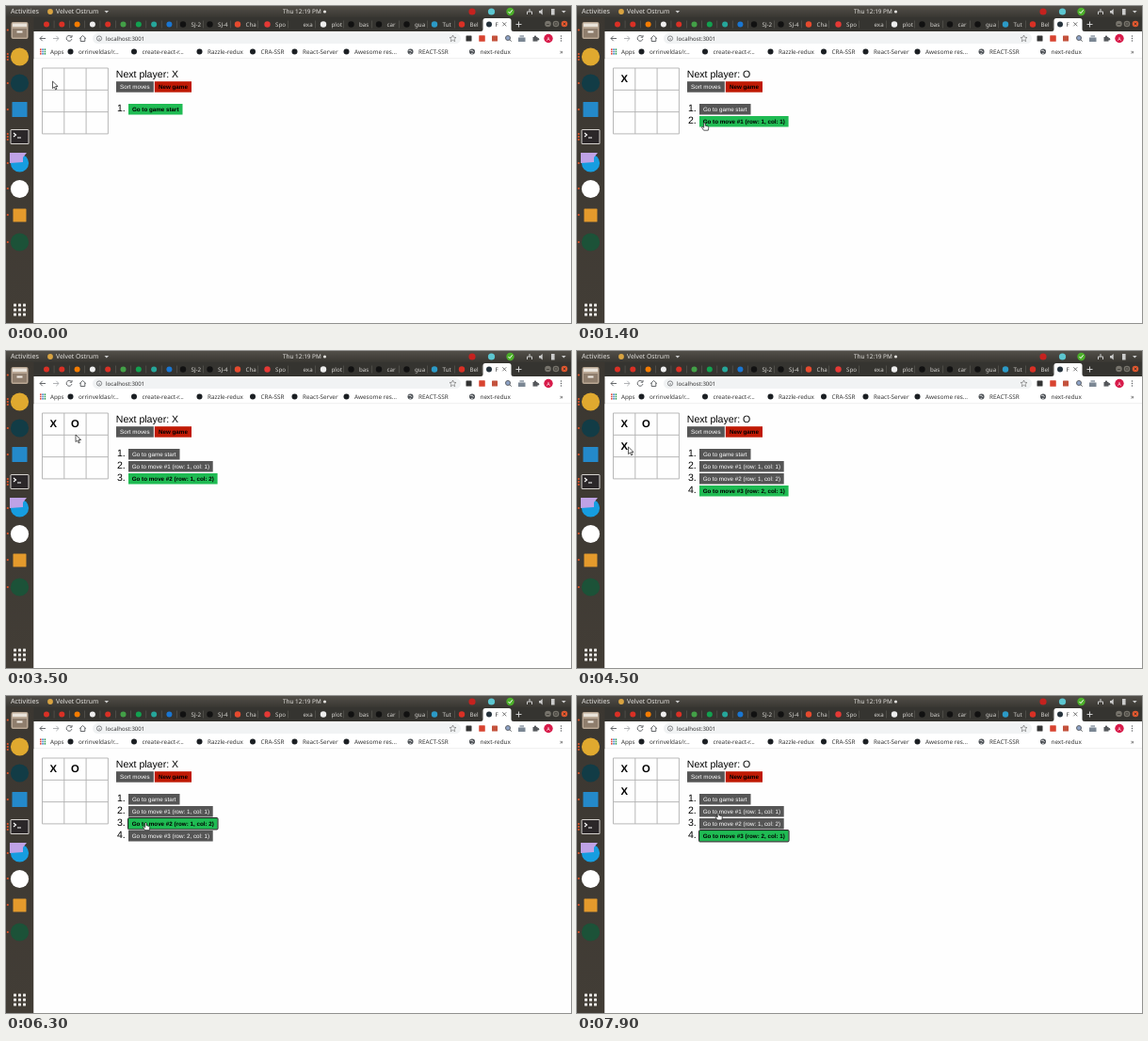
Animation of 600x337 px, one loop 8000 ms. Source, as an HTML page:

```html
<!DOCTYPE html>
<html lang="en">
<head>
<meta charset="utf-8">
<title>Tic-tac-toe moves</title>
<style>
html, body { margin: 0; width: 100%; height: 100%; overflow: hidden; background: #fff; }
svg { display: block; width: 600px; height: 337px; }
text { text-rendering: geometricPrecision; white-space: pre; }
.ui { font-family: "Noto Sans", "Open Sans", sans-serif; }
.page { font-family: "Liberation Sans", Arial, sans-serif; }
</style>
</head>
<body>
<svg viewBox="0 0 600 337">
  <defs>
    <linearGradient id="panel" x2="0" y2="1">
      <stop stop-color="#524f49"/><stop offset="1" stop-color="#393732"/>
    </linearGradient>
    <linearGradient id="dock" x2="0" y2="1">
      <stop stop-color="#3b3731"/><stop offset="1" stop-color="#423d36"/>
    </linearGradient>
  </defs>
  <g id="shell" class="ui"></g>
  <g id="game" class="page"></g>
  <g id="cursor"></g>
</svg>
<script>
const LOOP = 8000, STEP = 100;
const $ = id => document.getElementById(id);

const rect = (x, y, w, h, fill, more = '') =>
  `<rect x="${x}" y="${y}" width="${w}" height="${h}" fill="${fill}" ${more}/>`;
const dot = (x, y, r, fill, more = '') =>
  `<circle cx="${x}" cy="${y}" r="${r}" fill="${fill}" ${more}/>`;
const line = (d, color, w = 1) =>
  `<path d="${d}" fill="none" stroke="${color}" stroke-width="${w}"/>`;
const label = (x, y, size, fill, str, more = '') =>
  `<text x="${x}" y="${y}" font-size="${size}" fill="${fill}" ${more}>${str}</text>`;
const square = (x, y, s, fill) => rect(x - s / 2, y - s / 2, s, s, fill, 'rx=".6"');

function topBar() {
  const pale = '#e4e2df';
  return rect(0, 0, 600, 12, 'url(#panel)') +
    label(5, 8.4, 7.2, pale, 'Activities') +
    dot(47, 6, 2.9, '#d9a441') +
    label(53, 8.4, 6.8, pale, 'Velvet Ostrum') +
    '<path d="M104.500 5h4.600l-2.300 2.600z" fill="#ccc"/>' +
    label(294, 8.4, 6.4, pale, 'Thu 12:19 PM') + dot(338.5, 6, 1.6, pale) +
    dot(495, 6, 3.6, '#c5221f') + dot(515.5, 6, 3.6, '#5cc6d0') +
    dot(535.5, 6, 4.2, '#4caf2a') + line('M533.500 6l1.500 1.700 2.600-3.400', '#fff', 1) +
    line('M556 3v3M553.500 9v-3h5v3', '#ccc', 1) +
    '<path d="M566 5h1.500l2.200-2v6.500l-2.200-2h-1.500z" fill="#ccc"/>' +
    rect(579, 3, 3.6, 6.5, '#ccc') +
    '<path d="M590 5h4.600l-2.300 2.600z" fill="#ccc"/>';
}

function tabs() {
  let s = rect(29, 12, 571, 15, '#353430');
  const pins = ['#d93025', '#d93025', '#f57c00', '#eee', '#d93025',
    '#43a047', '#12a150', '#26a69a', '#1976d2'];
  pins.forEach((c, i) => {
    const x = 43 + i * 16.3;
    s += dot(x, 19.5, 3, c) + rect(x + 7.8, 15.5, .5, 8, '#66645f');
  });
  const open = [
    [188, '#111', 'SJ-2'], [216.5, '#111', 'SJ-4'], [246, '#e64a2e', 'Cha'],
    [277.5, '#e53935', 'Spo'], [307, '', 'exa'], [337, '#eee', 'plot'],
    [366.5, '#111', 'bas'], [396, '#111', 'car'], [425.5, '#111', 'gua'],
    [455, '#2c9ac7', 'Tut'], [484, '#d93025', 'Bel']
  ];
  open.forEach(([x, c, name]) => {
    if (c) s += dot(x, 19.5, 3.2, c);
    s += label(x + 8.5, 21.7, 6.2, '#d4d2ce', name) + rect(x + 21.5, 15.5, .5, 8, '#66645f');
  });
  const buttons = [['#77746c', 575.5], ['#77746c', 584], ['#e2582f', 593]];
  return s + '<path d="M504 27q2.500 0 2.500-2.500v-9q0-2.500 2.500-2.500h25q2.500 0 2.500 2.500v9q0 2.500 2.500 2.500z" fill="#fff"/>' +
    dot(513, 19.5, 3, '#25323c') + label(519.5, 21.7, 6.2, '#333', 'F') +
    line('M527.300 17.300l4 4m0-4l-4 4', '#555', .8) +
    line('M541.500 19.500h6m-3-3v6', '#ddd', .9) +
    buttons.map(([c, x]) => dot(x, 19, 3.3, c)).join('') +
    line('M574 19.500h3M582.700 17.700h2.600v2.600h-2.600zM591.700 17.700l2.600 2.600m0-2.600l-2.600 2.600', '#33312d', .7);
}

function toolbar() {
  const ink = '#55585c';
  return rect(29, 27, 571, 29, '#fff') +
    line('M42 34.500h-6m2.700-2.700l-2.700 2.700 2.700 2.700', ink, .9) +
    line('M50 34.500h6m-2.700-2.700l2.700 2.700-2.700 2.700', '#a9abae', .9) +
    line('M69.400 32.600a2.900 2.900 0 1 0 .5 2.500M70 31v2.200h-2.300', ink, .9) +
    line('M78 34.700l3.500-3.200 3.500 3.200M79.200 34v3.500h4.600V34', ink, .9) +
    rect(92, 29, 391, 11, '#f1f3f4', 'rx="5.500"') +
    `<circle cx="99" cy="34.500" r="2.600" fill="none" stroke="${ink}" stroke-width=".7"/>` +
    rect(98.7, 34, .7, 1.9, ink) +
    label(106, 36.7, 6.1, '#333', 'localhost:3001') +
    '<path d="M474.500 31l1 2.300 2.500.2-1.900 1.700.6 2.500-2.200-1.400-2.200 1.400.6-2.500-1.900-1.700 2.500-.2z" fill="none" stroke="#666" stroke-width=".6"/>' +
    square(491.5, 34.5, 6, '#333') + square(505.5, 34.5, 6.5, '#d8432f') +
    square(519, 34.5, 6, '#c4523d') +
    dot(533, 34, 2.5, '#8fa4c9', `stroke="${ink}" stroke-width=".9"`) +
    line('M534.700 35.700l2 2', ink, .9) +
    rect(544, 33.5, 7.5, 4.5, '#7b8794') + rect(545.5, 31, 4.5, 2.5, '#a9b2bb') +
    rect(559.5, 33, 5, 4.6, ink) + dot(562, 32.7, 1.2, ink) + dot(565, 35.3, 1.2, ink) +
    dot(576, 34.5, 4.7, '#d81b4a') + label(576, 36.5, 5.4, '#fff', 'A', 'text-anchor="middle"') +
    [32, 34.5, 37].map(y => dot(589.5, y, .7, ink)).join('');
}

function bookmarks() {
  let s = label(47, 50.9, 6.2, '#333', 'Apps') + label(588, 50.7, 7, '#444', '»');
  const tint = ['#e04a3f', '#4285c9', '#38a05a'];
  for (let i = 0; i < 9; i++)
    s += rect(36 + i % 3 * 2.3, 45.4 + (i / 3 | 0) * 2.3, 1.6, 1.6, tint[i % 3]);
  const items = [[68.5, 'orrinveldas/r...'], [136, 'create-react-r...'], [205.5, 'Razzle-redux'],
    [262, 'CRA-SSR'], [306.5, 'React-Server'], [361.5, 'Awesome res...'],
    [429.5, 'REACT-SSR', 1], [495, 'next-redux', 1]];
  items.forEach(([x, name, globe]) => {
    s += dot(x, 48.5, 3, globe ? '#4b4f54' : '#1b1f23');
    if (globe) s += line(`M${x - 2} 47.300h2.400l1 1.600M${x - 1} 50.300h1.700`, '#fff', .8);
    s += label(x + 8.5, 50.9, 6.35, '#333', name);
  });
  return s + rect(29, 55.6, 571, .6, '#dcdcdc');
}

function dock() {
  let s = rect(0, 12, 29.5, 325, 'url(#dock)');
  // file drawer
  s += rect(5.5, 17, 18, 18, '#b9a794', 'rx="2"') + rect(7, 18.5, 15, 3.5, '#e9e3da') +
    rect(7, 24, 15, 9.5, '#8f7e6d') + rect(11.5, 26.5, 6, 2, '#f1ece5');
  s += dot(14.5, 54, 9.6, '#e0a92f') + dot(14.5, 82, 9.6, '#123c46') +
    square(14.5, 110, 16, '#2489ca');
  // terminal
  s += rect(4.5, 131, 20, 16, '#d6d3cf', 'rx="1.500"') + rect(5.5, 132, 18, 14, '#2b2729') +
    line('M8 135l2.500 2-2.500 2M12 140h4', '#fff', 1.1);
  s += dot(14.5, 167, 9.6, '#169de0') +
    '<path d="M4 156h18l-4 5v5l-14 1z" fill="#bfa2e6"/>' +
    dot(14.5, 194.5, 9.6, '#fff') + square(14.5, 222.5, 14, '#e49a2c') +
    dot(14.5, 251, 9.6, '#1c5238');
  [25.5, 51, 54, 57, 82, 110, 136, 139, 142, 167, 194, 222, 251]
    .forEach(y => { s += dot(1.8, y, 1.1, '#e2562a'); });
  for (let i = 0; i < 9; i++)
    s += rect(8 + i % 3 * 5, 316.5 + (i / 3 | 0) * 5, 3, 3, '#eceae7', 'rx=".6"');
  return s;
}

// time, moves made, move shown, focused list row
const EVENTS = [
  [0, 0, 0, -1], [600, 1, 1, -1], [2600, 2, 2, -1], [4500, 3, 3, -1],
  [5500, 3, 3, 1], [5700, 3, 1, 1], [6200, 3, 1, 2], [6300, 3, 2, 2],
  [6800, 3, 2, 3], [7000, 3, 3, 3]
];
// time and pointer tip
const PATH = [
  [0, 49.5, 80], [600, 49.5, 80], [1400, 135.5, 124], [1700, 135.5, 124],
  [2300, 72, 78], [3100, 72, 78], [3500, 74, 89], [3600, 74, 89],
  [4100, 54.5, 102], [4500, 54.5, 102], [5300, 145, 124.5], [5600, 145.5, 125.3],
  [5800, 145.5, 125.3], [6200, 148.5, 134.5], [6300, 148.5, 134.5],
  [6700, 151, 147], [7000, 151, 147], [7500, 150.5, 127], [7700, 150.5, 127],
  [7900, 150, 123.7], [8000, 150, 123.7]
];
const MOVES = [[1, 1], [1, 2], [2, 1]];
const WIDTHS = [[54.5, 57.5], [89.7, 94.6]];
const BUTTON_H = 11.5;
const rowTop = i => 104 + i * 13;
const rowWidth = (i, on) => WIDTHS[i ? 1 : 0][on ? 1 : 0];

function button(x, y, w, str, bg, bold) {
  return rect(x, y, w, BUTTON_H, bg) +
    label(x + w / 2, y + 7.9, 6.25, bold ? '#000' : '#fff', str,
      'text-anchor="middle"' + (bold ? ' font-weight="700"' : ''));
}

function game([, made, shown, focus]) {
  let s = rect(29.5, 56.2, 570.5, 280.8, '#fefefe');
  for (let k = 0; k < 4; k++) {
    const x = 38.5 + k * 23.3, y = 66 + k * 23.3;
    s += line(`M${x} 66v69.900M38.500 ${y}h69.900`, '#b0b0b0', .9);
  }
  MOVES.slice(0, shown).forEach(([r, c], i) => {
    s += label(26.9 + c * 23.3, 57.9 + r * 23.3, 11.25, '#000', 'XO'[i % 2],
      'text-anchor="middle" font-weight="700"');
  });
  s += label(116.8, 76, 10.55, '#000', 'Next player: ' + 'XO'[shown % 2]) +
    button(117, 80.2, 39.8, 'Sort moves', '#555', false) +
    button(157.8, 80.2, 39.2, 'New game', '#c01a05', true);
  for (let i = 0; i <= made; i++) {
    const on = i === shown, y = rowTop(i), w = rowWidth(i, on);
    const str = i ? `Go to move #${i} (row: ${MOVES[i - 1][0]}, col: ${MOVES[i - 1][1]})` : 'Go to game start';
    s += label(118, y + 8, 10.55, '#000', i + 1 + '.') +
      button(130, y, w, str, on ? '#1fbb53' : '#555', on);
    if (i === focus)
      s += rect(129.6, y - .4, w + .8, BUTTON_H + .8, 'none', 'rx="1" stroke="#101010"');
  }
  return s;
}

function pointAt(t) {
  const n = PATH.findIndex(p => p[0] > t);
  const [t0, x0, y0] = PATH[n - 1], [t1, x1, y1] = PATH[n];
  const u = (t - t0) / (t1 - t0), e = u * u * (3 - 2 * u);
  return [x0 + (x1 - x0) * e, y0 + (y1 - y0) * e];
}

function pointer([x, y], [, made, shown]) {
  let hand = false;
  for (let i = 0; i <= made; i++)
    hand = hand || (x >= 130 && x <= 130 + rowWidth(i, i === shown) &&
      y >= rowTop(i) - .5 && y <= rowTop(i) + BUTTON_H);
  const d = hand
    ? 'M-.800 .800Q0-.500 .800 .800V3.200l2.700.7q.900.300.8 1.300l-.5 3H-.900l-2-3q-.400-1 .600-.900l1.500 1z'
    : 'M0 0v7.600l1.800-1.600 1.300 2.900 1.300-.600-1.300-2.800h2.500z';
  return `<path transform="translate(${x} ${y})" d="${d}" fill="#fff" stroke="#181818" stroke-width=".7" stroke-linejoin="round"/>`;
}

let last = -1;
function draw(time) {
  const t = Math.floor(time % LOOP / STEP) * STEP;
  if (t !== last) {
    last = t;
    const state = EVENTS.filter(e => e[0] <= t).pop();
    $('game').innerHTML = game(state);
    $('cursor').innerHTML = pointer(pointAt(t), state);
  }
}

$('shell').innerHTML = topBar() + tabs() + toolbar() + bookmarks() + dock();
const start = performance.now();
function tick() {
  draw(performance.now() - start);
  requestAnimationFrame(tick);
}
tick();
</script>
</body>
</html>
```
